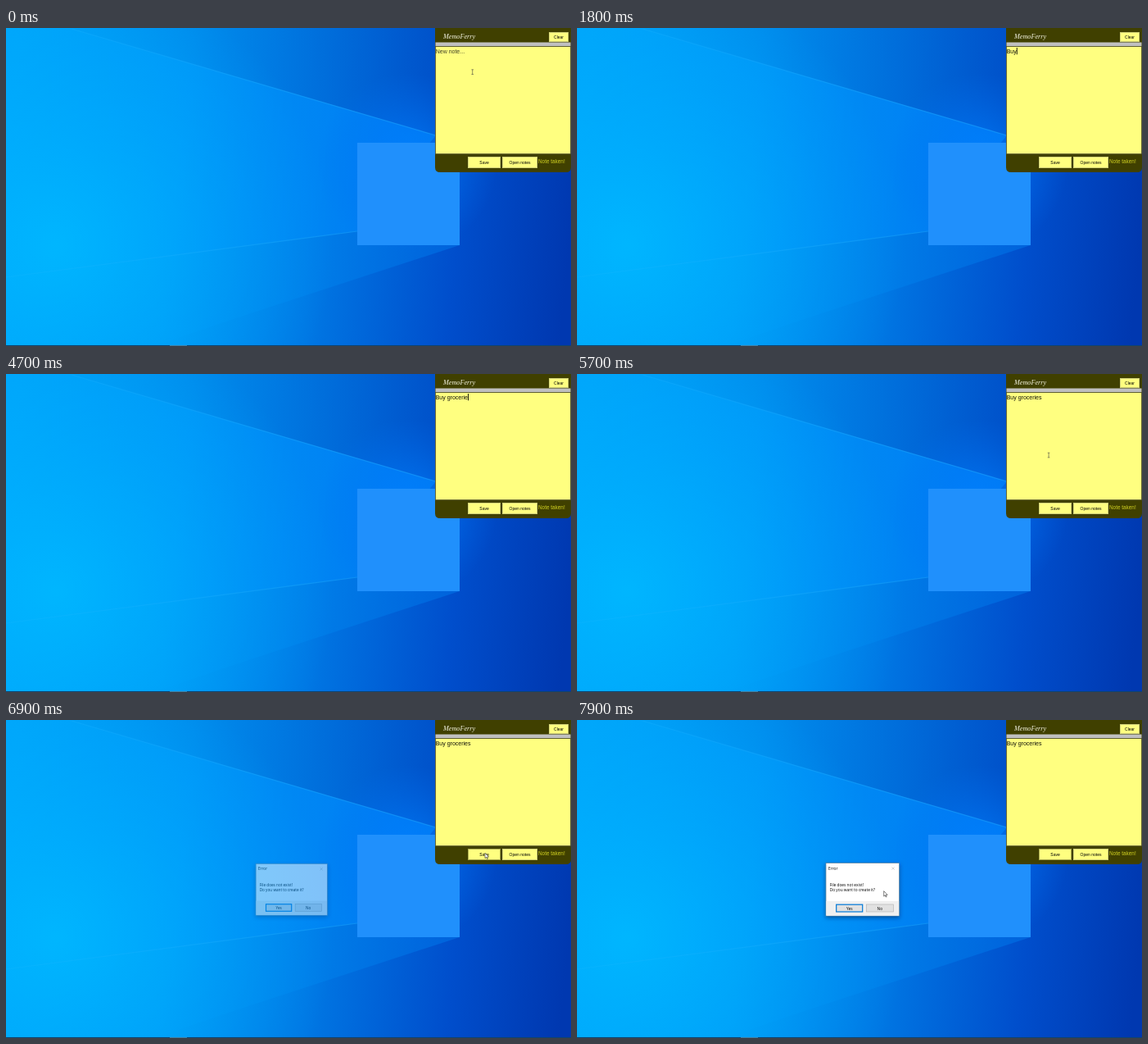
Animation of 690x388 px, one loop 8 s. Source, as an HTML page:

```html
<!DOCTYPE html>
<html lang="en">
<head>
<meta charset="utf-8">
<title>Sticky note</title>
<style>
  html, body { margin: 0; width: 100%; height: 100%; overflow: hidden; background: #0078e0; }
  svg { display: block; width: 100vw; height: 100vh; }
  text { font-family: "Liberation Sans", Arial, sans-serif; white-space: pre; }
  .label { font-size: 5px; text-anchor: middle; }
  .dialog text { font-family: "Open Sans", "Noto Sans", sans-serif; font-size: 4.8px; }
  .title { font: italic 8.2px "Liberation Serif", serif; }
</style>
</head>
<body>
<svg viewBox="0 0 690 388" preserveAspectRatio="none">
  <defs>
    <linearGradient id="sky" gradientUnits="userSpaceOnUse" x1="0" y1="180" x2="690" y2="250">
      <stop offset="0" stop-color="#00a6fa"/>
      <stop offset=".3" stop-color="#0098f4"/>
      <stop offset=".55" stop-color="#0078e4"/>
      <stop offset=".8" stop-color="#004ecc"/>
      <stop offset="1" stop-color="#0038b0"/>
    </linearGradient>
    <linearGradient id="upper" gradientUnits="userSpaceOnUse" x1="80" y1="0" x2="525" y2="0">
      <stop offset="0" stop-color="#0090ec" stop-opacity=".2"/>
      <stop offset=".5" stop-color="#0078e0" stop-opacity=".6"/>
      <stop offset="1" stop-color="#0050c8" stop-opacity=".8"/>
    </linearGradient>
    <linearGradient id="beam" gradientUnits="userSpaceOnUse" x1="0" y1="0" x2="500" y2="0">
      <stop offset="0" stop-color="#00a0ff" stop-opacity="0"/>
      <stop offset="1" stop-color="#0088ff" stop-opacity=".75"/>
    </linearGradient>
    <linearGradient id="lower" gradientUnits="userSpaceOnUse" x1="0" y1="0" x2="554" y2="0">
      <stop offset="0" stop-color="#00b0ff" stop-opacity="0"/>
      <stop offset="1" stop-color="#0078ec" stop-opacity=".5"/>
    </linearGradient>
    <linearGradient id="ray" gradientUnits="userSpaceOnUse" x1="0" y1="0" x2="525" y2="0">
      <stop offset="0" stop-color="#20b8ff" stop-opacity=".2"/>
      <stop offset="1" stop-color="#20a8ff" stop-opacity=".5"/>
    </linearGradient>
    <radialGradient id="glow" gradientUnits="userSpaceOnUse" cx="490" cy="165" r="110">
      <stop offset="0" stop-color="#0080ff" stop-opacity=".8"/>
      <stop offset="1" stop-color="#0070f0" stop-opacity="0"/>
    </radialGradient>
    <radialGradient id="haze" gradientUnits="userSpaceOnUse" cx="60" cy="265" r="340">
      <stop offset="0" stop-color="#00b8ff" stop-opacity=".9"/>
      <stop offset="1" stop-color="#00a8ff" stop-opacity="0"/>
    </radialGradient>
    <filter id="shadow" x="-20%" y="-20%" width="140%" height="150%">
      <feDropShadow dx="0" dy="2" stdDeviation="2.5" flood-color="#002050" flood-opacity=".55"/>
    </filter>
  </defs>

  <rect width="690" height="388" fill="url(#sky)"/>
  <path d="M80 1L525 131L690 90V0H80Z" fill="url(#upper)"/>
  <path d="M0 0H80L525 131L429 248L0 304Z" fill="url(#beam)"/>
  <path d="M0 304L429 248L554 229V265L290 351L180 388H0Z" fill="url(#lower)"/>
  <circle cx="60" cy="265" r="340" fill="url(#haze)"/>
  <circle cx="490" cy="165" r="110" fill="url(#glow)"/>
  <path d="M80 1L525 131M0 304L429 248" stroke="url(#ray)" stroke-width="1.2" fill="none"/>
  <rect x="429" y="140" width="125" height="125" fill="#2090fc"/>
  <path d="M0 387.5H690" stroke="#104470"/>
  <path d="M200 387.5H221" stroke="#4080a4"/>

  <path d="M524 0H690V170Q690 176 684 176H530Q524 176 524 170Z" fill="#404000"/>
  <rect x="524.5" y="17.5" width="165" height="4.5" fill="#c0c0c0"/>
  <rect x="524.4" y="22.5" width="165.2" height="131.2" fill="#ffff80" stroke="#505030" stroke-width=".8"/>
  <text class="title" x="534" y="13" fill="#f4f4e4">MemoFerry</text>
  <g id="buttons"></g>
  <text x="650" y="165.2" font-size="6.4" fill="#d0d020">Note taken!</text>
  <text id="note" x="524.7" y="30.5" font-size="7"></text>
  <path id="caret" stroke="#000" stroke-width=".9"/>

  <g id="dialog" class="dialog">
    <rect x="304" y="174.5" width="89.5" height="64.5" fill="#fff" stroke="#5b7f9c" stroke-width=".7" filter="url(#shadow)"/>
    <rect x="304.4" y="221" width="88.7" height="17.6" fill="#f0f0f0"/>
    <text x="307" y="182.8">Error</text>
    <path d="M384.5 179.5l3.2 3.2m0-3.2l-3.2 3.2" stroke="#aaa" stroke-width=".5"/>
    <text x="308.7" y="203">File does not exist!</text>
    <text x="308.7" y="209.2">Do you want to create it?</text>
    <rect x="316.7" y="225.2" width="32" height="8.8" fill="#e1e1e1" stroke="#0078d7" stroke-width="1.2"/>
    <rect x="353.3" y="225" width="33" height="9" fill="#e1e1e1" stroke="#adadad" stroke-width=".6"/>
    <text x="332.8" y="231.5" text-anchor="middle">Yes</text>
    <text x="369.8" y="231.5" text-anchor="middle">No</text>
  </g>

  <path id="arrow" d="M0 0V6.4L1.5 5L2.5 7.3L3.5 6.9L2.5 4.7H4.5Z" fill="#fff" stroke="#000" stroke-width=".5"/>
  <path id="beamCursor" d="M-1.3-2.7H1.3M0-2.7V3M-1.3 3H1.3" fill="none" stroke="#606048" stroke-width=".7"/>
</svg>
<script>
const LOOP = 8000, STEP = 100, BLINK = 530;
const FOCUS = 500, CLICK = 6800;
const TEXT = "Buy groceries";
const KEY_TIMES = [900, 1500, 1800, 2000, 2200, 3000, 3500, 3900, 4100, 4400, 4500, 4700, 4900].map(t => t - 40);
const POINTER = [[0, 569.7, 53.5], [5300, 569.7, 53.5], [6200, 585, 162.3], [7100, 585, 162.3], [7800, 374.7, 208.7]];

const $ = id => document.getElementById(id);
const show = (el, on) => el.setAttribute("visibility", on ? "visible" : "hidden");

const button = (id, x, y, w, h, label) => `<rect id="${id}" x="${x}" y="${y}" width="${w}" height="${h}"
  fill="#ffff80" stroke="#d0d078"/>
  <text class="label" x="${x + w / 2}" y="${y + h / 2 + 1.8}">${label}</text>`;
$("buttons").innerHTML =
  button("clear", 663.5, 5.5, 23, 11, "Clear") +
  button("save", 564.5, 157.5, 39, 13, "Save") +
  button("open", 606.5, 157.5, 42, 13, "Open notes");

function pointerAt(t) {
  const next = POINTER.findIndex(p => p[0] > t);
  if (next < 0) return POINTER.at(-1).slice(1);
  const [t0, x0, y0] = POINTER[next - 1], [t1, x1, y1] = POINTER[next];
  const u = (t - t0) / (t1 - t0), k = u * u * (3 - 2 * u);
  return [x0 + (x1 - x0) * k, y0 + (y1 - y0) * k];
}

function drawNote(t) {
  const count = KEY_TIMES.filter(k => k <= t).length;
  const focused = t >= FOCUS && t <= CLICK;
  const since = t - (count ? KEY_TIMES[count - 1] : FOCUS);
  const note = $("note");
  note.textContent = t < FOCUS ? "New note..." : TEXT.slice(0, count);
  note.setAttribute("fill", t < FOCUS ? "#404024" : "#101008");
  const x = 525.2 + (count ? note.getComputedTextLength() : 0);
  $("caret").setAttribute("d", `M${x} 24V32.3`);
  show($("caret"), focused && Math.floor(since / BLINK) % 2 === 0);
}

function drawPointer(t) {
  const [x, y] = pointerAt(t);
  const visible = t < FOCUS + 300 || t >= 5300;
  const overNote = x > 524 && y > 22 && y < 154;
  for (const id of ["arrow", "beamCursor"]) {
    $(id).setAttribute("transform", `translate(${x} ${y})`);
    show($(id), visible && overNote === (id === "beamCursor"));
  }
}

function drawDialog(t) {
  const p = Math.min(1, Math.max(0, (t - CLICK) / 200));
  const scale = 0.95 + 0.05 * p;
  $("dialog").setAttribute("opacity", p);
  $("dialog").setAttribute("transform", `translate(348.5 206.5) scale(${scale}) translate(-348.5 -206.5)`);
  $("save").setAttribute("stroke", t >= CLICK ? "#a8a850" : "#d0d078");
}

function frame() {
  const t = Math.floor(performance.now() % LOOP / STEP) * STEP;
  drawNote(t);
  drawPointer(t);
  drawDialog(t);
  requestAnimationFrame(frame);
}
frame();
</script>
</body>
</html>
```
